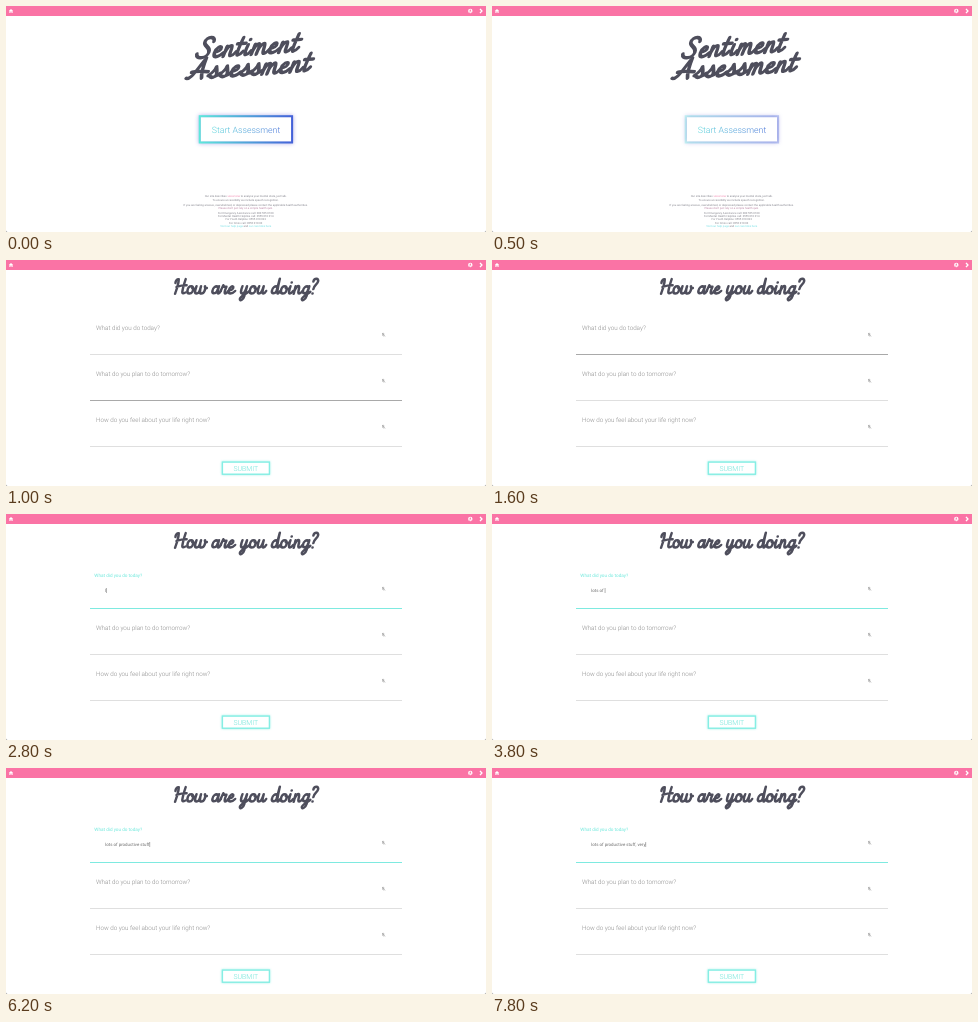
Write an HTML page that moves like this. It is 480x226 px and loops after 8 s.

```html
<!DOCTYPE html>
<html lang="en">
<head>
<meta charset="utf-8">
<title>Sentiment Assessment</title>
<style>
  html, body { margin: 0; width: 100%; height: 100%; overflow: hidden; background: #fff; }
  svg { display: block; width: 100vw; height: 100vh; }
  text { font-family: Roboto, Arial, sans-serif; font-weight: 300; text-rendering: geometricPrecision; white-space: pre; }
  .script { fill: none; stroke: #4e4e5c; stroke-width: 2.7; stroke-linecap: round; stroke-linejoin: round; }
  .mid { text-anchor: middle; }
  .label { font-size: 6.25px; fill: #8c8c8c; }
  .label.float { font-size: 4.65px; font-weight: 400; fill: #6fe8dc; }
  .foot { font-size: 2.75px; font-weight: 400; fill: #80808a; }
  .pink { fill: #ee7ea8; }
  .mauve { fill: #b982a2; }
  .cyan { fill: #6fdde2; }
</style>
</head>
<body>
<svg viewBox="0 0 480 226">
  <defs>
    <linearGradient id="sea" gradientUnits="userSpaceOnUse" x1="193" y1="0" x2="287" y2="0">
      <stop offset="0" stop-color="#5de9db"/>
      <stop offset="1" stop-color="#4361d8"/>
    </linearGradient>
  </defs>
  <rect width="480" height="226" fill="#fff"/>

  <g id="header">
    <rect width="480" height="10" fill="#fa73a5"/>
    <path d="M2.8 5.1 5 3 7.2 5.1H6.6V7H5.5V5.6H4.5V7H3.4V5.1Z" fill="#fff"/>
    <circle cx="464.3" cy="5" r="2.2" fill="#fff"/>
    <circle cx="464.3" cy="4.2" r=".8" fill="#fa73a5"/>
    <path d="M462.9 6.4Q464.3 5 465.7 6.4" fill="none" stroke="#fa73a5" stroke-width=".7"/>
    <path d="M474 2.9 475.9 5 474 7.1" fill="none" stroke="#fff" stroke-width="1.4"/>
  </g>

  <g id="home">
    <g id="title" role="img" aria-label="Sentiment Assessment"></g>
    <g style="filter:drop-shadow(0 0 2px rgba(85,80,205,.48))">
      <rect x="195" y="111.2" width="90" height="24.3" fill="#fff"/>
      <rect id="border" x="193.7" y="110.2" width="92.4" height="26.3" fill="none" stroke="url(#sea)" stroke-width="2"/>
    </g>
    <text class="mid" x="240" y="126.5" font-size="8.75" fill="url(#sea)">Start Assessment</text>
    <g id="footer"></g>
  </g>

  <g id="form">
    <g id="heading" role="img" aria-label="How are you doing?"></g>
    <g id="fields"></g>
    <text id="typed" x="99.2" font-size="4.4" y="78" fill="#6c6c6c" style="font-weight:400"></text>
    <rect id="caret" y="74" width=".5" height="5" fill="#666"/>
    <rect x="216.4" y="202.1" width="47" height="12.1" fill="#fff" stroke="#86eee4" stroke-width="1.4"
      style="filter:drop-shadow(0 0 1.2px rgba(100,230,215,.6))"/>
    <text class="mid" x="239.8" y="210.6" font-size="6.9" fill="#6ae4d8">SUBMIT</text>
  </g>

  <path d="M0 224.4V226H1.6Q.3 225.7 0 224.4ZM480 224.4V226H478.4Q479.7 225.7 480 224.4Z" fill="#999"/>
</svg>
<script>
const LOOP = 8000;
const $ = id => document.getElementById(id);

function add(parent, tag, attrs, text) {
  const el = document.createElementNS('http://www.w3.org/2000/svg', tag);
  for (const key in attrs) el.setAttribute(key, attrs[key]);
  if (text) el.textContent = text;
  return parent.appendChild(el);
}

// Brush letters: advance width and centre line, baseline at y = 0
const bowl = 'M6.6 -7C3.5 -9.5 .8 -6 1 -3C1.2 0 4.5 .5 6 -3';
const cup = 'M1.8 -8C.5 -3 1 -.3 3 -.3C5 -.3 6 -4 6.6 -8';
const glyphs = {
  H: [13.4, 'M.4 -11.5Q0 -15.6 3.2 -15.4C4 -10 2.4 -4 1.8 0M10.6 -15.6C9.6 -10 9 -5 9.2 -2Q9.6 .3 12.5 -1.4M2.2 -7.4Q7 -9 12.6 -9'],
  S: [13, 'M11 -12.5C11 -17 4 -17 4 -12.5C4 -9 10 -8.5 9.5 -4C9 .8 1 1 .5 -3.5'],
  A: [16.5, 'M.3 -1C4 1 6 -7 11 -16C10.5 -10 10.5 -4 12 -.3M3 -5.5Q8 -6.5 15.5 -5'],
  a: [9.6, bowl + 'L7.2 -8C6.6 -4 6.4 -.3 7.8 -.3Q9 -.5 10 -3'],
  d: [9.6, bowl + 'L7.4 -16C6.6 -5 6.6 0 8 -.3Q9.3 -.8 10 -3'],
  e: [7.5, 'M1.5 -4C4 -4 5.6 -5.5 5.2 -7C4.5 -9 1 -7.5 1 -3.5C1 1 5 .5 7.8 -3'],
  g: [9, bowl + 'L7 -8L5.8 2C5 7 1.5 8 1.2 5.5C1 3 5 1.5 9 -2'],
  i: [5.5, 'M2 -8C1 -3 1.2 -.3 2.6 -.3Q4.3 -.5 5.5 -3M2.6 -12h.1'],
  m: [13.5, 'M1.2 0L1.9 -8M1.5 -3C2.5 -7 4 -8.6 5 -8C6 -7 5.2 -3 5 0M5.3 -3C6.3 -7 8 -8.6 9 -8C10.5 -7 8.5 -.3 11 -.3Q12.5 -.5 14 -3'],
  n: [9.5, 'M1.2 0L1.9 -8M1.5 -3C2.5 -7 4 -8.6 5.4 -8C7 -7 4.5 -.3 7 -.3Q8.7 -.5 10 -3'],
  o: [8.4, 'M4.2 -8C1.5 -8 1 -5 1 -3.3C1 -1 2.2 -.3 3.7 -.3C6.4 -.3 7.2 -3 6.8 -5C6.5 -7 5.5 -8 4.2 -8M5.8 -6Q7 -4.5 9 -5.4'],
  r: [7.8, 'M.2 -3L2 -9Q2.6 -7.4 5.6 -7.4C4.6 -4 4.2 -.3 5.8 -.3Q7 -.3 8.2 -3'],
  s: [8, 'M0 -2Q4 -5 4.2 -8.6C5 -6 7 -3 5.5 -1Q3.5 .5 1.5 -1.2M5.5 -1Q7.5 -1.5 8.5 -3'],
  t: [6.5, 'M3.2 -14C2 -6 1 -.3 2.8 -.3Q4.5 -.5 6 -3M0 -9.3H6.4'],
  u: [9.6, cup + 'C6 -3 6 -.3 7.5 -.3Q9 -.5 10 -3'],
  w: [12.7, 'M1.5 -8C.5 -3 .5 -.3 2.8 -.3C5 -.3 6 -4 6.3 -8C5.5 -3 6 -.3 8 -.3C11 -.3 12 -6 10.5 -8Q11 -5 12.8 -6'],
  y: [9.4, cup + 'L5.6 2C5 7 1.5 8 1.2 5.5C1 3 5 1.5 9.5 -2.5'],
  '?': [7, 'M1.6 -13C1.6 -17 7 -17 6.5 -13C6.1 -10 2.6 -9 2.8 -5M2.6 -.4h.1'],
  ' ': [5.5, '']
};

function brush(parent, word, transform) {
  const line = add(parent, 'g', { class: 'script', transform });
  let x = 0;
  for (const ch of word) {
    const [width, d] = glyphs[ch];
    if (d) add(line, 'path', { d, transform: `translate(${x} 0)` });
    x += width;
  }
}
brush($('title'), 'Sentiment', 'translate(188.8 52.5) rotate(-4) scale(1.31 1.25) skewX(-20)');
brush($('title'), 'Assessment', 'translate(179.4 73.6) rotate(-4) scale(1.34 1.25) skewX(-20)');
brush($('heading'), 'How are you doing?', 'translate(167.4 33.8) scale(.94) skewX(-9)');

// Each footer row: baseline, then alternating text and class
const footer = [
  [191.4, 'Our site describes ', '', 'voice tone', 'pink', ' to analyse your mental state, just talk.', ''],
  [194.8, 'To ensure accessibility we include speech recognition.', ''],
  [199.5, 'If you are feeling anxious, overwhelmed, or depressed please contact the applicable health authorities.', ''],
  [202.9, "Please don't just rely on a simple health quiz.", 'mauve'],
  [207.9, 'For Emergency Assistance call: 000 555 0100', ''],
  [211.1, 'For Mental Health Helpline call: 0555 010 014', ''],
  [214.4, 'For Youth Helpline: 0555 010 022', ''],
  [217.8, 'For Crisis call: 0555 010 03', ''],
  [221, 'Visit our help page', 'cyan', ' and ', '', 'our care links here', 'cyan']
];
for (const [y, ...runs] of footer) {
  const row = add($('footer'), 'text', { class: 'mid foot', x: 239.7, y });
  for (let i = 0; i < runs.length; i += 2) add(row, 'tspan', { class: runs[i + 1] }, runs[i]);
}

const questions = ['What did you do today?', 'What do you plan to do tomorrow?', 'How do you feel about your life right now?'];
const fields = questions.map((question, i) => {
  const y = 94.5 + 46 * i;
  add($('fields'), 'path', {
    d: `M376.6 ${y - 21.2}h1.2v1.6h-1.2zM376.2 ${y - 19.3}q1.1 1.5 2.3 .2M376.2 ${y - 21.4}l2.9 3.5`,
    fill: 'none', stroke: '#888', 'stroke-width': .45
  });
  return {
    line: add($('fields'), 'path', { d: `M84 ${y}H396`, 'stroke-width': .9 }),
    label: add($('fields'), 'text', { x: 90, y: y - 24.3, class: 'label' }, question)
  };
});

const answer = 'lots of productive stuff, very';
// [time, letters typed]
const keys = [[2800, 1], [3000, 2], [3100, 3], [3400, 4], [3500, 6], [3600, 7], [3800, 8], [4000, 10], [4100, 11],
  [4500, 12], [4600, 13], [4700, 14], [5000, 15], [5100, 16], [5200, 18], [5300, 19], [5500, 20], [5600, 21],
  [6000, 22], [6100, 23], [6200, 24], [6900, 25], [7100, 26], [7500, 27], [7800, 30]];

const show = (el, on) => el.setAttribute('visibility', on ? 'visible' : 'hidden');

function draw(t) {
  const onForm = t >= 1000, focused = t >= 2000;
  $('home').style.display = onForm ? 'none' : '';
  $('form').style.display = onForm ? '' : 'none';

  const fade = Math.min(1, Math.max(0, (Math.floor(t / 100) - 1) / 6));
  $('border').setAttribute('opacity', 1 - fade);

  const hovered = t < 1600 ? 1 : focused ? -1 : 0;
  fields.forEach(({ line, label }, i) => {
    const active = focused && i === 0;
    line.setAttribute('stroke', active ? '#70e8dd' : i === hovered ? '#a0a0a0' : '#dcdcdc');
    if (i) return;
    label.setAttribute('class', active ? 'label float' : 'label');
    label.setAttribute('x', active ? 88.3 : 90);
    label.setAttribute('y', active ? 62.6 : 70.2);
  });

  const typed = keys.reduce((n, [at, count]) => t >= at ? count : n, 0);
  $('typed').textContent = answer.slice(0, typed);
  const end = typed && onForm ? $('typed').getComputedTextLength() : 0;
  $('caret').setAttribute('x', 99.3 + end);
  show($('caret'), t >= 2300 && !(t >= 6800 && t < 6900));
}

const start = performance.now();
function tick(now) {
  draw(Math.max(0, now - start) % LOOP);
  requestAnimationFrame(tick);
}
draw(0);
requestAnimationFrame(tick);
</script>
</body>
</html>
```
